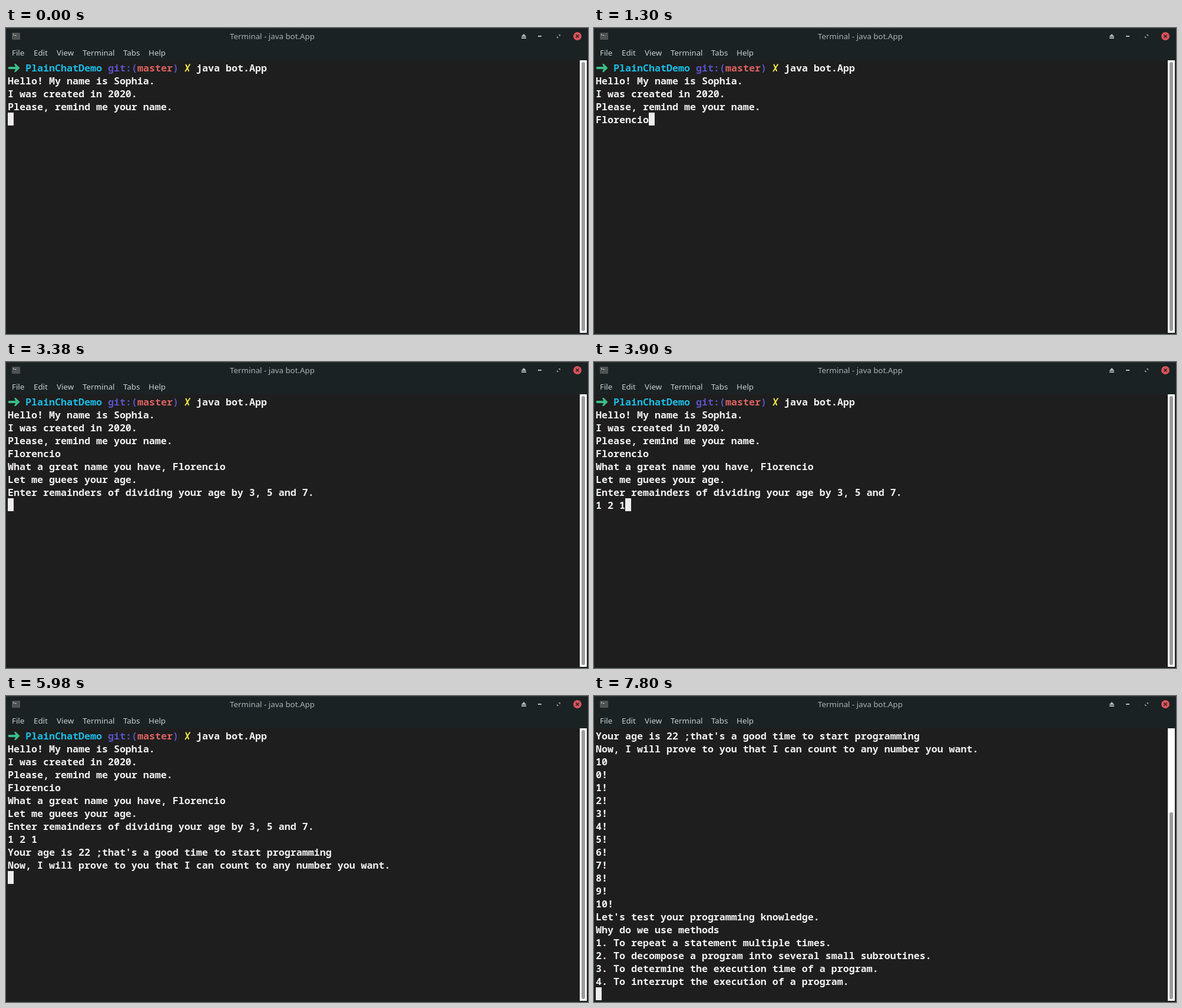
An HTML page with a canvas that plays this animation: 988 px wide and 521 px high, repeating every 8 s.

```html
<!DOCTYPE html>
<html lang="en">
<head>
<meta charset="utf-8">
<title>Terminal</title>
<style>
html, body { margin: 0; width: 100%; height: 100%; overflow: hidden; background: #1b2224; }
canvas { display: block; }
</style>
</head>
<body>
<canvas id="stage" width="988" height="521"></canvas>
<script>
const ctx = document.getElementById('stage').getContext('2d');
const LOOP = 8000, STEP = 1300;
const CELL = 10, ROW = 22, LEFT = 3, TOP = 56, VISIBLE_ROWS = 21;
const CHROME = '#1b2224', PAPER = '#1e1e1e', INK = '#f2f0f0';
const MONO = '600 16.667px "Noto Sans Mono", monospace';
const SANS = '13.33px "Noto Sans", sans-serif';
const NAME = 'Florencio';

// Each entry is what appears at one step; the cursor stays at the end.
const chunks = [
  '\nHello! My name is Sophia.\nI was created in 2020.\nPlease, remind me your name.\n',
  NAME,
  `\nWhat a great name you have, ${NAME}\nLet me guees your age.\n` +
    'Enter remainders of dividing your age by 3, 5 and 7.\n',
  '1 2 1',
  "\nYour age is 22 ;that's a good time to start programming\n" +
    'Now, I will prove to you that I can count to any number you want.\n',
  '10',
  '\n' + Array.from({ length: 11 }, (_, i) => `${i}!\n`).join('') +
    "Let's test your programming knowledge.\nWhy do we use methods\n" +
    '1. To repeat a statement multiple times.\n' +
    '2. To decompose a program into several small subroutines.\n' +
    '3. To determine the execution time of a program.\n' +
    '4. To interrupt the execution of a program.\n'
];

const prompt = [
  [3, 'PlainChatDemo', '#1abde6'],
  [17, 'git:(', '#5a53c8'],
  [22, 'master', '#dd6262'],
  [28, ')', '#5a53c8'],
  [32, 'java bot.App', INK]
];

const menu = [[10, 'File'], [47, 'Edit'], [86, 'View'], [130, 'Terminal'], [199, 'Tabs'], [242, 'Help']];

function rect(x, y, w, h, color) {
  ctx.fillStyle = color;
  ctx.fillRect(x, y, w, h);
}

function pill(x, y, w, h, r, color) {
  ctx.fillStyle = color;
  ctx.beginPath();
  ctx.roundRect(x, y, w, h, r);
  ctx.fill();
}

function polygon(points, color) {
  ctx.fillStyle = color;
  ctx.beginPath();
  points.forEach(([x, y]) => ctx.lineTo(x, y));
  ctx.fill();
}

function strokes(lines, width, color, cap = 'butt') {
  ctx.strokeStyle = color;
  ctx.lineWidth = width;
  ctx.lineCap = cap;
  ctx.lineJoin = 'round';
  ctx.beginPath();
  for (const line of lines) {
    line.forEach(([x, y], i) => i ? ctx.lineTo(x, y) : ctx.moveTo(x, y));
  }
  ctx.stroke();
}

function text(str, x, y, font, color) {
  ctx.font = font;
  ctx.fillStyle = color;
  ctx.fillText(str, x, y);
}

function drawTitleBar() {
  text('Terminal - java bot.App', 380, 19, SANS, '#a9b3b5');
  menu.forEach(([x, label]) => text(label, x, 47, SANS, '#c8cfd0'));

  pill(10, 8, 14, 12, 1, '#505354');
  strokes([[[12, 10.5], [13.5, 11.5], [12, 12.5]], [[14.5, 12.5], [17.5, 12.5]]], 1, '#d0d3d3');

  const icon = '#b4bcbe';
  polygon([[879, 10], [883.5, 15], [874.5, 15]], icon);
  rect(875, 16, 8, 2, icon);
  rect(903, 13, 6, 2, icon);
  polygon([[937.5, 11], [941, 11], [941, 14.5]], '#8f9799');
  polygon([[935, 13.5], [935, 17], [938.5, 17]], '#8f9799');

  ctx.fillStyle = '#d9545b';
  ctx.beginPath();
  ctx.arc(970, 14, 7, 0, Math.PI * 2);
  ctx.fill();
  strokes([[[967.5, 11.5], [972.5, 16.5]], [[972.5, 11.5], [967.5, 16.5]]], 1.6, '#2a2022');
}

function drawPrompt(y) {
  strokes([[[5.5, y + 12], [18, y + 12]]], 4, '#3dbd8a', 'round');
  polygon([[14, y + 5], [16.5, y + 5], [23.5, y + 12], [16.5, y + 19], [14, y + 19], [17, y + 12]], '#3dbd8a');
  strokes([[[304.5, y + 17.5], [312, y + 6]], [[305.5, y + 6.5], [310, y + 17]]], 2, '#f0e84a', 'round');
  prompt.forEach(([col, str, color]) => text(str, LEFT + col * CELL, y + 18, MONO, color));
}

function draw(time) {
  const step = Math.floor(time % LOOP / STEP);
  const lines = chunks.slice(0, step + 1).join('').split('\n');
  const scroll = Math.max(0, lines.length - VISIBLE_ROWS);

  rect(0, 0, 988, 521, CHROME);
  rect(0, 0, 988, 1, '#2b3335');
  drawTitleBar();
  rect(2, 55, 972, 464, PAPER);

  lines.slice(scroll).forEach((line, i) => {
    const y = TOP + i * ROW;
    if (i + scroll === 0) drawPrompt(y);
    else text(line, LEFT, y + 18, MONO, INK);
  });
  const last = lines.length - 1;
  rect(LEFT + lines[last].length * CELL, TOP + (last - scroll) * ROW, CELL, ROW, '#eeecec');

  rect(974, 55, 12, 464, '#ffffff');
  const thumbTop = scroll ? 198 : 58;
  pill(977, thumbTop, 6, 516 - thumbTop, 3, '#9c9c9c');
}

function tick() {
  draw(performance.now());
  requestAnimationFrame(tick);
}
tick();
</script>
</body>
</html>
```
